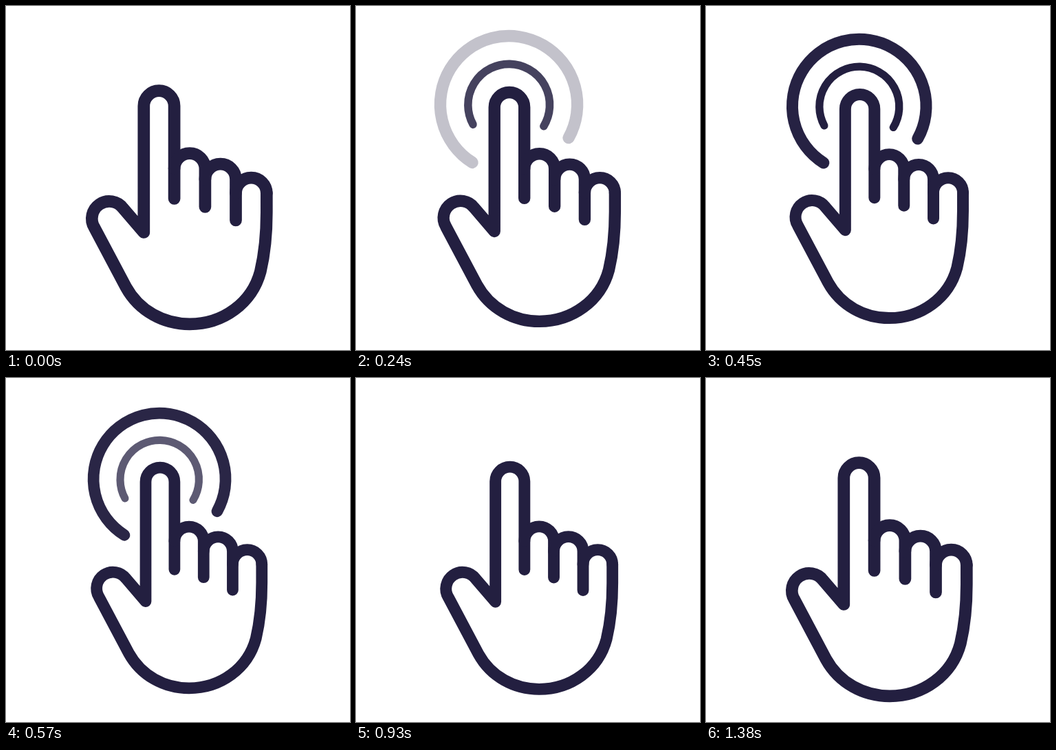
Write an HTML page that moves like this. It is 500 by 500 pixels and loops after 2.7 s.

```html
<!DOCTYPE html>
<html lang="en">
<head>
<meta charset="utf-8">
<title>Tap gesture</title>
<style>
  html, body { margin: 0; width: 100%; height: 100%; overflow: hidden; background: #fff; }
  svg { display: block; width: 100%; height: 100%; }
  path { fill: none; stroke: #231f40; stroke-width: 17.7; stroke-linecap: round; stroke-linejoin: round; }
  #inner { stroke-width: 11.8; }
</style>
</head>
<body>
<svg viewBox="0 0 500 500">
  <g id="icon">
    <path id="outer" opacity="0" d="M167.5 227A101.5 101.5 0 1 1 310.2 190.5"/>
    <path id="inner" opacity="0" d="M168.5 170.6A60.5 60.5 0 1 1 273.3 173.2"/>
    <!-- palm, thumb and index finger -->
    <path d="M378.8 272V300C378.8 335 375 364 369.8 386C357.5 432 315.5 462.4 267 462.4
             C229.5 462.4 193.5 443.5 174.3 408.5L128.5 322.2A25.2 25.2 0 0 1 170.2 294L200.3 329
             V145.3A22.15 22.15 0 0 1 244.6 145.3V280"/>
    <!-- folded fingers -->
    <path d="M244.6 236.5A22.4 22.4 0 0 1 289.4 236.5V292"/>
    <path d="M289.4 252A22.3 22.3 0 0 1 334 252V311.5"/>
    <path d="M334 272A22.4 22.4 0 0 1 378.8 272"/>
  </g>
</svg>
<script>
const LOOP = 2700, STEP = 30;
const $ = id => document.getElementById(id);
const icon = $("icon"), inner = $("inner"), outer = $("outer");

// Each track is a list of [time in ms, value], linear in between.
const tracks = {
  scale: [[65, 1], [715, 0.93], [1380, 1]],
  inner: [[0, 0], [285, 1], [490, 1], [790, 0]],
  outer: [[160, 0], [455, 1], [560, 1], [855, 0]]
};

function valueAt(track, t) {
  if (t <= track[0][0]) return track[0][1];
  for (let i = 1; i < track.length; i++) {
    const [t0, a] = track[i - 1], [t1, b] = track[i];
    if (t < t1) return a + (b - a) * (t - t0) / (t1 - t0);
  }
  return track[track.length - 1][1];
}

function draw(now) {
  const t = Math.floor((now % LOOP) / STEP) * STEP;
  const s = valueAt(tracks.scale, t);
  icon.setAttribute("transform", `translate(250 250) scale(${s}) translate(-250 -250)`);
  inner.setAttribute("opacity", valueAt(tracks.inner, t));
  outer.setAttribute("opacity", valueAt(tracks.outer, t));
}

const start = performance.now();
function tick() {
  draw(performance.now() - start);
  requestAnimationFrame(tick);
}
tick();
</script>
</body>
</html>
```
